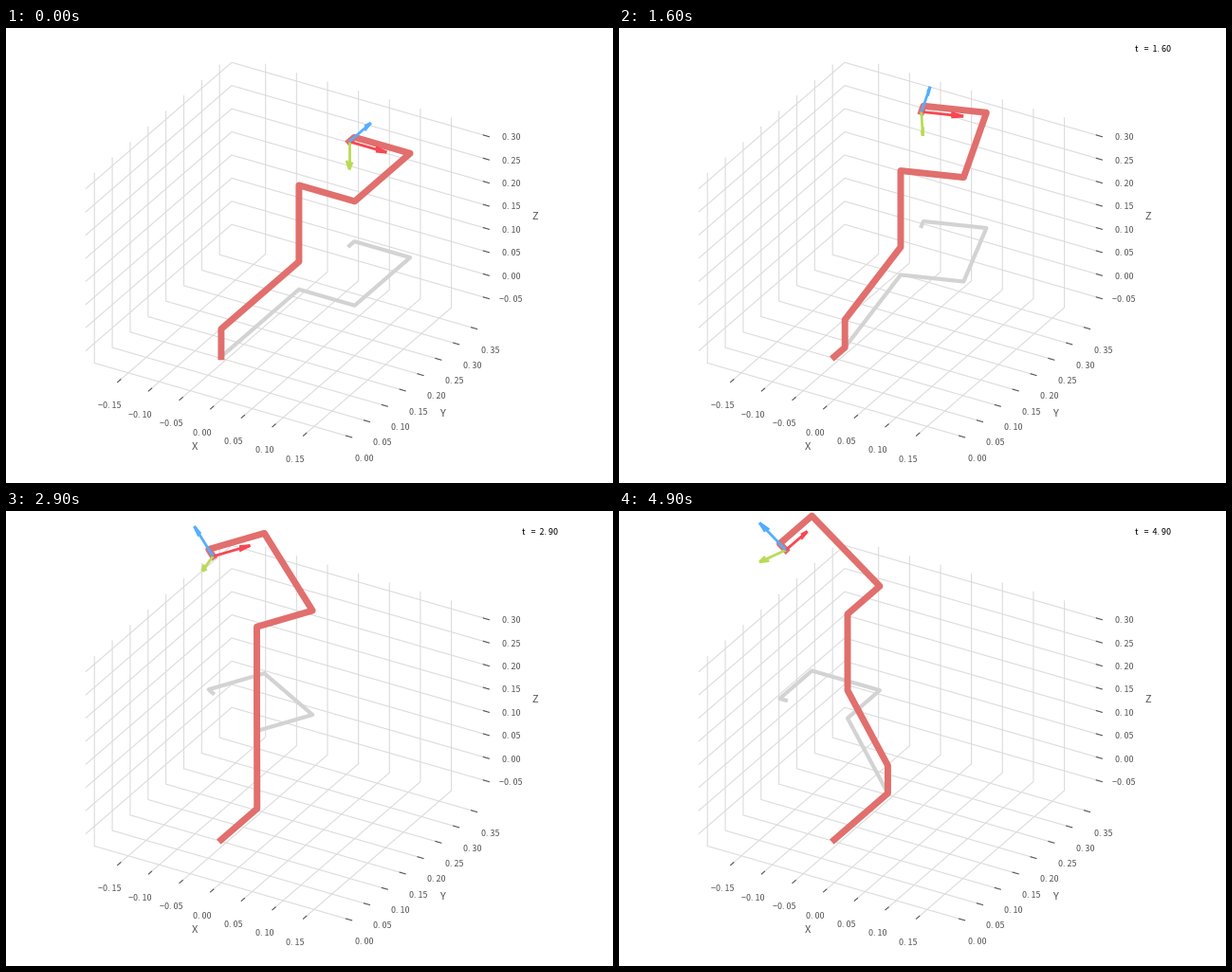
These frames come from a looping animation (640x480 px, 5 s). A matplotlib script:

```python
import matplotlib.pyplot as plt
import numpy as np
from matplotlib.animation import FuncAnimation
from matplotlib.collections import LineCollection

W, H, DPI = 640, 480, 100
FRAMES, INTERVAL = 50, 100

# Orthographic view: pixel = ORIGIN + point @ AXES
ORIGIN = np.array([226.9, 346.8])
AXES = np.array([[653.0, 188.6], [377.0, -326.6], [0.0, -488.4]])
X_LO, X_HI = -0.2047, 0.2042
Y_LO, Y_HI = -0.0236, 0.3839
Z_LO, Z_HI = -0.0927, 0.3170

GRID, INK = "#dcdcdc", "#555555"
ROBOT, SHADOW = "#e16f6d", "#d3d3d3"
ARROW_COLORS = ["#f84752", "#bada55", "#54aeff"]
ARROW_LENGTH, HEAD_RATIO, HEAD_ANGLE = 0.06, 0.3, np.radians(15)

# Robot dimensions
RISER, UPPER, COLUMN = 0.06, 0.2175, 0.165
SIDE, FORE, TIP = 0.09, 0.155, 0.014
SLIDE, TURN = 0.15, np.pi / 4

plt.rcParams["font.family"] = "Noto Sans CJK JP"
fig = plt.figure(figsize=(W / DPI, H / DPI), dpi=DPI, facecolor="white")
ax = fig.add_axes([0, 0, 1, 1])
ax.set(xlim=(0, W), ylim=(H, 0))
ax.axis("off")


def project(points):
    return ORIGIN + np.asarray(points, dtype=float) @ AXES


def polyline(points, **style):
    return ax.plot(*project(points).T, **style)[0]


def label(x, y, text, size=6.45, color=INK):
    return ax.text(x, y + size / 2, text, size=size, color=color,
                   ha="center", va="baseline")


def number(value):
    return f"{value:.2f}".replace(".", ". ").replace("-", "\u2212")


def tick(edge, outward, value, offset):
    """Tick mark across the box edge, with its number beside it."""
    edge, outward = np.array(edge), np.array(outward)
    polyline([edge - 0.0033 * outward, edge + 0.0075 * outward],
             color=INK, lw=0.8, solid_capstyle="butt", zorder=2)
    x, y = project(edge) + offset
    label(x, y, number(value))


def draw_box():
    grid = dict(color=GRID, lw=0.8, zorder=1)
    for x in np.arange(-3, 4) * 0.05:
        polyline([(x, Y_HI, Z_HI), (x, Y_HI, Z_LO), (x, Y_LO, Z_LO)], **grid)
        tick((x, Y_LO, Z_LO), (0, -1, 0), x, (-11, 26.5))
    for y in np.arange(8) * 0.05:
        polyline([(X_LO, y, Z_HI), (X_LO, y, Z_LO), (X_HI, y, Z_LO)], **grid)
        tick((X_HI, y, Z_LO), (1, 0, 0), y, (18, 23))
    for z in np.arange(-1, 7) * 0.05:
        polyline([(X_LO, Y_LO, z), (X_LO, Y_HI, z), (X_HI, Y_HI, z)], **grid)
        tick((X_HI, Y_HI, z), (1, 0, 0), z, (27.5, 1.5))
    for name, x, y in (("X", 198.5, 441), ("Y", 460.5, 406), ("Z", 557.5, 198)):
        label(x, y, name, size=8)


def ease(u):
    return u ** 3 * (10 - 15 * u + 6 * u * u)


def heading(angle):
    """Sideways and forward unit vectors after a turn about z."""
    c, s = np.cos(angle), np.sin(angle)
    return np.array([c, s, 0]), np.array([-s, c, 0])


def pose(s):
    """Joint positions and tool axes at travel fraction s."""
    turn = TURN * s
    up = np.array([0, 0, 1.0])
    arm = heading(turn)[1]
    side, front = heading(2 * turn)
    fore = np.cos(turn) * front + np.sin(turn) * up
    down = np.sin(turn) * front - np.cos(turn) * up
    steps = [np.zeros(3), np.array([0, SLIDE * s, 0]), RISER * up, UPPER * arm,
             COLUMN * up, SIDE * side, FORE * fore, -SIDE * side, -TIP * fore]
    return np.cumsum(steps, axis=0), (side, down, fore)


def arrow_segments(base, direction):
    """Shaft and two barbs, the barbs tilted about a horizontal axis."""
    flat = np.hypot(direction[0], direction[1])
    if flat > 1e-9:
        axis = np.array([direction[1], -direction[0], 0]) / flat
    else:
        axis = np.array([0, 1.0, 0])
    end = base + ARROW_LENGTH * direction
    segments = [project([base, end])]
    for angle in (HEAD_ANGLE, -HEAD_ANGLE):
        barb = direction * np.cos(angle) + np.cross(axis, direction) * np.sin(angle)
        segments.append(project([end, end - HEAD_RATIO * ARROW_LENGTH * barb]))
    return segments


draw_box()
shadow, = ax.plot([], [], color=SHADOW, lw=3, zorder=3)
robot, = ax.plot([], [], color=ROBOT, lw=5, zorder=4)
arrows = [ax.add_collection(LineCollection([], colors=c, linewidths=2, zorder=5),
                            autolim=False) for c in ARROW_COLORS]
clock = label(563.5, 22, "", color="black")


def update(i):
    joints, tool = pose(ease(i / (FRAMES - 1)))
    robot.set_data(*project(joints).T)
    shadow.set_data(*project(joints * [1, 1, 0]).T)
    for arrow, direction in zip(arrows, tool):
        arrow.set_segments(arrow_segments(joints[-1], direction))
    clock.set_text(f"t   =  {number(i * INTERVAL / 1000)}" if i else "")
    return [shadow, robot, *arrows, clock]


anim = FuncAnimation(fig, update, frames=FRAMES, interval=INTERVAL,
                     init_func=lambda: update(0), repeat=True, repeat_delay=0)
plt.show()
```
